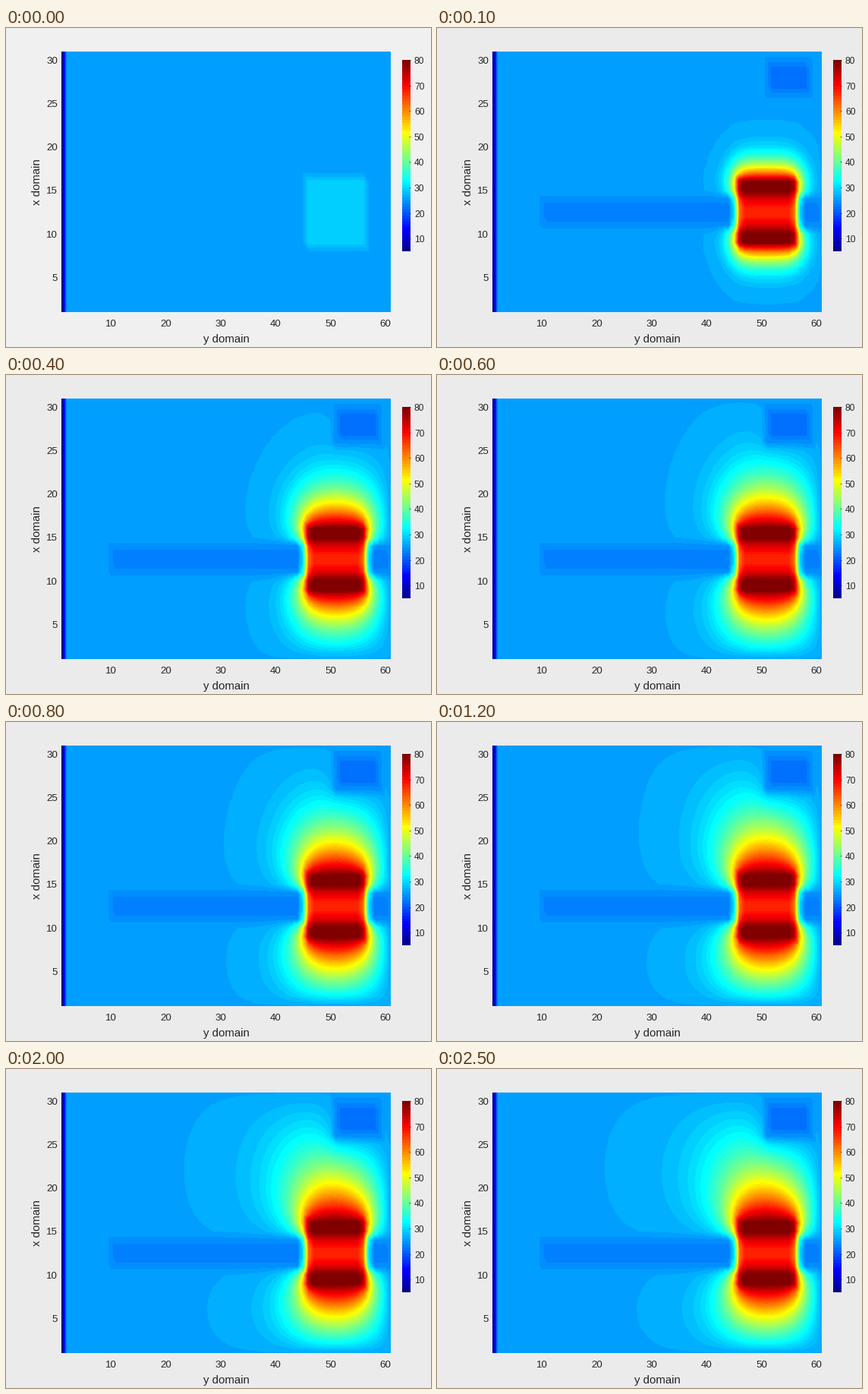
Write a matplotlib script that moves like this. It is 560 by 420 pixels and loops after 2.6 s.

```python
import matplotlib.pyplot as plt
import numpy as np
from matplotlib.animation import FuncAnimation

W, H, DPI = 560, 420, 100
FRAMES, INTERVAL = 26, 100
ROWS, COLS = 31, 61
LEFT, TOP, RIGHT, BOTTOM = 73, 31, 507, 374
T_MIN, T_MAX, AMBIENT, RIM = 5, 80, 26, 24.3
DIFFUSIVITY, SUBSTEPS = 2.5, 14
INK = "#262626"

plt.rcParams["font.family"] = "Liberation Sans"


def jet64():
    """64-step jet: three trapezoids shifted by 16 steps."""
    i = np.arange(64)

    def ramp(center):
        return np.clip((24 - np.abs(i - center)) / 16, 0, 1)

    rgb = np.stack([ramp(47), ramp(31), ramp(15)], axis=1)
    return np.round(rgb * 255).astype(np.uint8)


def block(r0, r1, c0, c1):
    """Inclusive 1-based node range as array slices."""
    return slice(r0 - 1, r1), slice(c0 - 1, c1)


def fixed_nodes():
    held = np.full((ROWS, COLS), np.nan)

    def hold(r0, r1, c0, c1, value):
        held[block(r0, r1, c0, c1)] = value

    held[[0, -1], :] = AMBIENT
    held[:, [1, -1]] = AMBIENT
    held[:, 0] = 0

    # Cooling channel and cold spot, each with a milder rim
    for c0, c1 in ((10, 44), (58, 61)):
        hold(11, 14, c0, c1, RIM)
    for c0, c1 in ((11, 44), (58, 60)):
        hold(12, 13, c0, c1, 23)
    hold(26, 30, 51, 59, RIM)
    hold(27, 29, 52, 58, 22)

    # Heater crossed by the channel
    hold(9, 16, 46, 56, 80.5)
    hold(11, 14, 46, 56, 72.5)
    hold(12, 13, 46, 56, 67.8)
    for edge, outside in ((46, 45), (56, 57)):
        hold(9, 16, edge, edge, 76)
        hold(11, 14, edge, edge, 66)
        hold(12, 13, edge, edge, 62)
        hold(11, 14, outside, outside, 34)
        hold(12, 13, outside, outside, 30)
    return held


def simulate():
    start = np.full((ROWS, COLS), float(AMBIENT))
    start[:, 0] = 0
    start[block(9, 16, 46, 56)] = 29.1
    fields = [start]

    held = fixed_nodes()
    is_held = ~np.isnan(held)
    # Cooled nodes are shown cold but only pull their surroundings to ambient
    sink = np.maximum(held, AMBIENT)
    t = np.where(is_held, sink, AMBIENT)
    step = DIFFUSIVITY / SUBSTEPS
    for _ in range(FRAMES - 1):
        for _ in range(SUBSTEPS):
            flow = np.zeros_like(t)
            flow[1:-1, 1:-1] = (t[2:, 1:-1] + t[:-2, 1:-1] + t[1:-1, 2:]
                                + t[1:-1, :-2] - 4 * t[1:-1, 1:-1])
            t = np.where(is_held, sink, t + step * flow)
        fields.append(np.where(is_held, held, t))
    return fields


def shade(t):
    """Interpolate over two triangles per cell and look up the colours."""
    w, h = RIGHT - LEFT, BOTTOM - TOP
    x = (np.arange(w) + 0.5) / w * (COLS - 1)
    y = (h - np.arange(h) - 0.5) / h * (ROWS - 1)
    c, r = np.meshgrid(x.astype(int), y.astype(int))
    u, v = np.meshgrid(x % 1, y % 1)
    bl, br = t[r, c], t[r, c + 1]
    tl, tr = t[r + 1, c], t[r + 1, c + 1]
    lower = bl + u * (br - bl) + v * (tl - bl)
    upper = tr + (1 - u) * (tl - tr) + (1 - v) * (br - tr)
    value = np.where(u + v <= 1, lower, upper)
    index = np.floor((value - T_MIN) / (T_MAX - T_MIN) * 64)
    return JET[np.clip(index, 0, 63).astype(int)]


JET = jet64()
FIELDS = simulate()

fig = plt.figure(figsize=(W / DPI, H / DPI), dpi=DPI)
ax = fig.add_axes([0, 0, 1, 1])
ax.axis("off")


def label(x, y, text, px, **kw):
    kw = {"ha": "center", "va": "center_baseline", **kw}
    ax.text(x, y, text, fontsize=px * 72 / DPI, color=INK, **kw)


plot = ax.imshow(shade(FIELDS[0]), extent=(LEFT, RIGHT, BOTTOM, TOP),
                 interpolation="nearest")
ax.imshow(JET[::-1, None], extent=(522, 533, 294, 42), interpolation="nearest")
ax.set(xlim=(0, W), ylim=(H, 0), aspect="auto")

for n in range(10, 61, 10):
    label(LEFT + (n - 1) * (RIGHT - LEFT) / (COLS - 1), 388.5, n, 13.33)
for n in range(5, 31, 5):
    label(68, BOTTOM - (n - 1) * (BOTTOM - TOP) / (ROWS - 1), n, 13.33, ha="right")
for n in range(10, 81, 10):
    y = 294 - (n - T_MIN) / (T_MAX - T_MIN) * 252
    ax.plot([530.5, 533], [y, y], color=INK, lw=0.4)
    label(538, y + 0.5, n, 12, ha="left")
label(290.5, 408.5, "y domain", 15)
label(41, 202.5, "x domain", 15, rotation=90, va="center")


def update(frame):
    plot.set_data(shade(FIELDS[frame]))
    fig.set_facecolor("#f0f0f0" if frame == 0 else "#ebebeb")
    return [plot]


anim = FuncAnimation(fig, update, frames=FRAMES, interval=INTERVAL,
                     repeat=True, repeat_delay=0)
plt.show()
```
